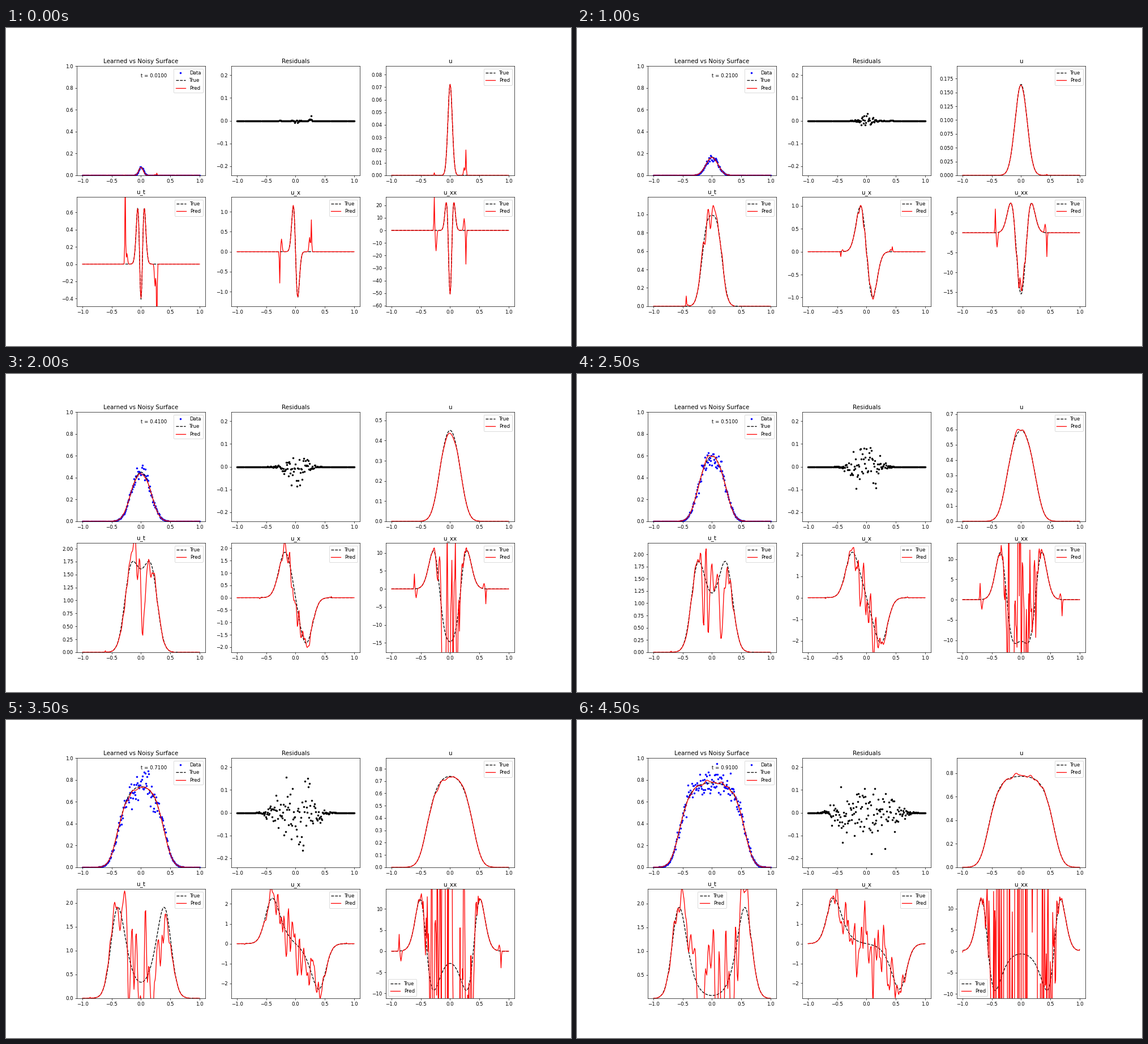
Recreate the animation shown at these times as a matplotlib script. Size 998x561 px, loop 5 s.

```python
import numpy as np
import matplotlib.pyplot as plt
from matplotlib.animation import FuncAnimation

D, R, K = 0.02, 10.0, 0.78          # diffusion, growth rate, capacity
DX, DT, STEPS = 0.005, 0.0002, 50   # solver grid; one record per 0.01
FRAMES, INTERVAL, DPI = 10, 500, 62.375

# Wiggle of each prediction: level at capacity, envelope power, smoothing in samples
NOISE = {"u": (.016, 1.5, 3), "u_t": (.8, 1, 1.6), "u_x": (.95, 1.2, 1.2), "u_xx": (60, 2.2, .7)}
# Kink at the edge of the front: early size, late size, (tip, trail) on the left and right
KINK = {"u": (.02, 0, (.1, 0), (1, .3)), "u_t": (1, .02, (1, .12), (-1, -.25)),
        "u_x": (.75, .04, (-1, .4), (1, .45)), "u_xx": (23, 4, (1, -.6), (-1, .35))}
NAMES = list(NOISE)


def solve():
    """Logistic growth with diffusion and closed ends, recorded every 0.01."""
    grid = np.linspace(-1, 1, round(2 / DX) + 1)
    u = 0.1 * K * np.exp(-grid**2 / 0.002)
    out = [u[::2]]
    for _ in range(FRAMES * 10):
        for _ in range(STEPS):
            p = np.pad(u, 1, mode="reflect")
            lap = (p[2:] - 2 * u + p[:-2]) / DX**2
            u = u + DT * (D * lap + R * u * (1 - u / K))
        out.append(u[::2])
    return grid[::2], np.array(out)


def time(i):
    return 0.01 + 0.1 * i


def truth(i):
    j, h = 1 + 10 * i, x[1] - x[0]
    u = record[j]
    p = np.pad(u, 1, mode="reflect")
    return {"u": u, "u_t": (record[j + 1] - record[j - 1]) / 0.02,
            "u_x": np.gradient(u, h), "u_xx": (p[2:] - 2 * u + p[:-2]) / h**2}


def smooth_noise(rng, n, width):
    k = np.exp(-0.5 * (np.arange(-12, 13) / width) ** 2)
    return np.convolve(rng.standard_normal(n + 24), k / np.sqrt((k**2).sum()), "valid")


def kinks(i, name):
    """Sharp tips with a softer trail, moving outwards ahead of the front."""
    early, late, left, right = KINK[name]
    edge = round(0.26 + 0.865 * time(i), 2)
    inward = edge - np.abs(x)
    tip = np.exp(-(inward / 0.008) ** 2)
    trail = np.exp(-((inward - 0.03) / 0.015) ** 2)
    a, b = np.where(x < 0, np.reshape(left, (2, 1)), np.reshape(right, (2, 1)))
    return (early * np.exp(-12 * time(i)) * 1.13 + late) * (a * tip + b * trail)


def predict(i, name, true):
    rng = np.random.default_rng(100 * i + NAMES.index(name))
    amp, power, width = NOISE[name]
    wiggle = amp * (true["u"] / K) ** power * smooth_noise(rng, len(x), width)
    return true[name] + wiggle + kinks(i, name)


def sample(i, u):
    rng = np.random.default_rng(500 + i)
    return u * (1 + 0.085 * rng.standard_normal(len(x)))


def limits(name, y):
    lo, hi = 1.2 * y.min(), 1.2 * y.max()
    if name == "u" or abs(lo) < 0.0026 * hi:   # under half a pixel
        lo = 0
    return lo, hi


def legend_place(i, name):
    if name == "u_xx" and i >= 7:
        return "lower left"
    if name == "u_t" and i == 9:
        return "upper center"
    return "upper right"


def true_pred(ax):
    true, = ax.plot(x, zero, "k--", label="True")
    pred, = ax.plot(x, zero, "r", label="Pred")
    return true, pred


x, record = solve()
zero = np.zeros_like(x)

fig, axes = plt.subplots(2, 3, figsize=(998 / DPI, 561.0001 / DPI), dpi=DPI)
fig.subplots_adjust(left=.125, right=.9, bottom=.125, top=.88, wspace=.2, hspace=.2)
surface, resid, *panels = axes.flat

data, = surface.plot(x, zero, "b.", label="Data")
fit = true_pred(surface)
clock = surface.text(0, 0.9, "")
surface.set(title="Learned vs Noisy Surface", ylim=(0, 1))
surface.legend(loc="upper right")

dots, = resid.plot(x, zero, "k.")
resid.set(title="Residuals", ylim=(-.2395, .2395))

lines, legends = {}, {}
for ax, name in zip(panels, NAMES):
    lines[name] = true_pred(ax)
    legends[name] = ax.legend(loc="upper right")
    ax.set_title(name)
for ax in axes.flat:
    ax.set_xlim(-1.1, 1.1)


def draw(i):
    true = truth(i)
    pred = {name: predict(i, name, true) for name in NAMES}
    for ax, name in zip(panels, NAMES):
        lines[name][0].set_ydata(true[name])
        lines[name][1].set_ydata(pred[name])
        ax.set_ylim(limits(name, true[name]))
        legends[name].set_loc(legend_place(i, name))
    noisy = sample(i, true["u"])
    data.set_ydata(noisy)
    dots.set_ydata(pred["u"] - noisy)
    fit[0].set_ydata(true["u"])
    fit[1].set_ydata(pred["u"])
    clock.set_text(f"t = {time(i):.4f}")
    return []


anim = FuncAnimation(fig, draw, frames=FRAMES, interval=INTERVAL, repeat=True, repeat_delay=0)
plt.show()
```
